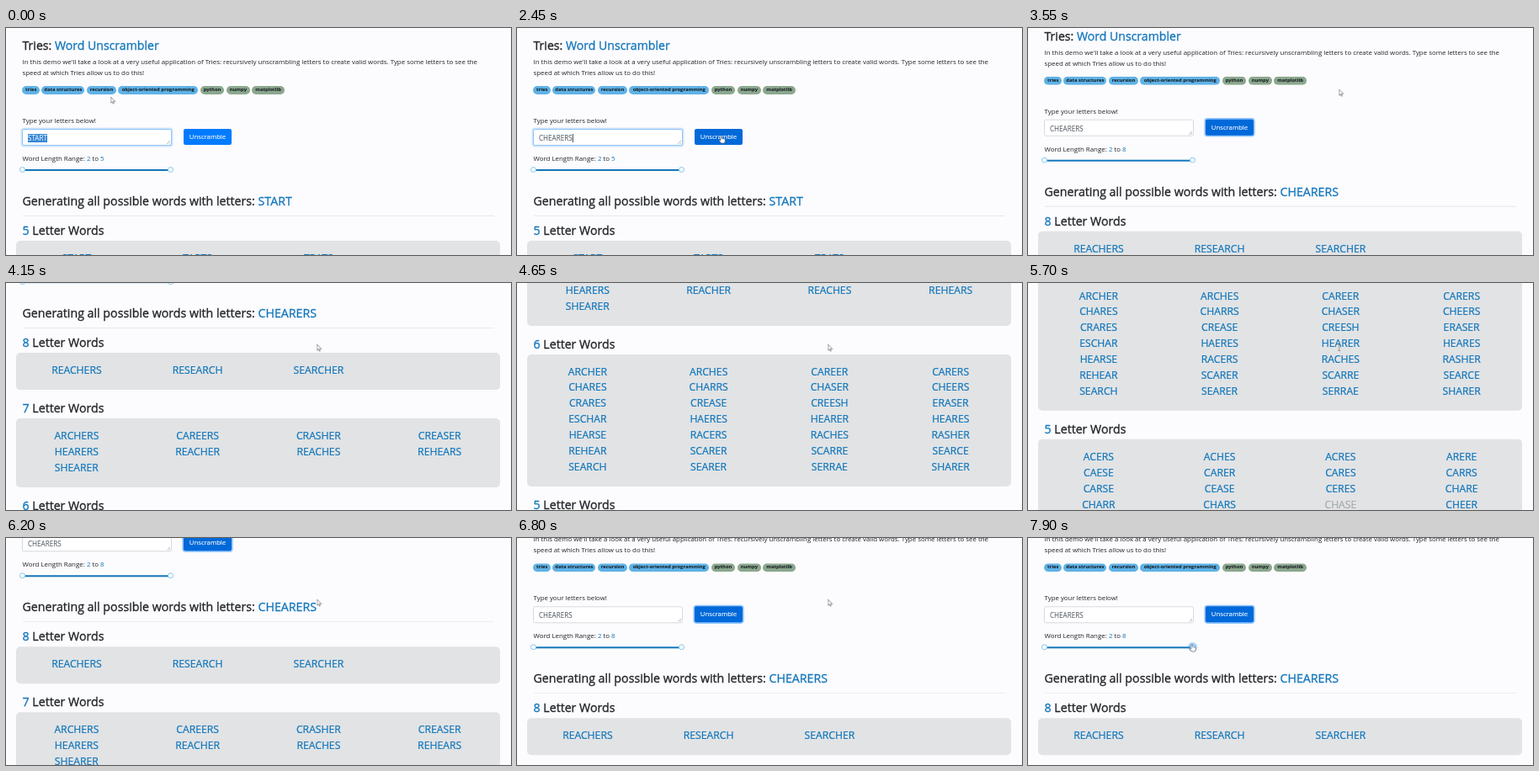
Animation, 600 px wide and 270 px high, one loop 8 s. Source, as an HTML page:

```html
<!DOCTYPE html>
<html lang="en">
<head>
<meta charset="utf-8">
<title>Word Unscrambler</title>
<style>
  :root { --blue: #1377bb; --ink: #212529; }
  html, body { margin: 0; width: 100%; height: 100%; overflow: hidden; background: #fcfbfd; }
  body { position: relative; font: 7.85px/20px "Open Sans", "Noto Sans", sans-serif; color: var(--ink); }
  b { font-weight: 400; color: var(--blue); }
  .page, .page > *, .cursor, .cursor svg { position: absolute; }
  .page { inset: 0; }
  .text { left: 19.5px; white-space: nowrap; }
  .big, h2 { font-size: 14.2px; -webkit-text-stroke: .32px currentColor; }
  .swap { display: inline-grid; }
  .swap > * { grid-area: 1 / 1; }

  .tag { top: 69.3px; height: 9.4px; border-radius: 5px; background: #5fb2e6; color: #10171c;
    font-size: 5.85px; font-weight: 700; line-height: 9px; text-align: center; white-space: nowrap; }
  .tag.lib { background: #8ba78e; }

  .field { left: 19px; top: 120px; width: 177.5px; height: 20px; box-sizing: border-box;
    border: 1px solid #ced4da; border-radius: 2.2px; background: #fff; color: #495057; font-size: 8.1px; }
  .field > * { position: absolute; top: 4.5px; left: 6px; height: 10.5px; line-height: 10.5px; white-space: nowrap; }
  .selected { background: #3487d6; color: #fff; }
  .typed { overflow: hidden; }
  .caret { width: .5px; background: #444; }
  .field .grip { left: auto; top: auto; right: 1px; bottom: 1px; width: 4px; height: 4px;
    background: linear-gradient(135deg, #0000 50%, #bbb 50% 62%, #0000 62% 78%, #bbb 78% 90%, #0000 90%); }
  .button { left: 211px; top: 119.5px; width: 57px; height: 19.5px; border-radius: 2.2px;
    background: #007bff; color: #fff; font-size: 7.75px; line-height: 19.5px; text-align: center;
    -webkit-text-stroke: .12px #fff; }

  .track { left: 19px; top: 167.5px; width: 177px; height: 2px; background: var(--blue); }
  .handle { top: 165px; width: 5px; height: 5px; border: 1.1px solid #7cc5ee; border-radius: 50%; background: #fff; }
  .rule { left: 19.5px; top: 222.5px; width: 560px; height: 1px; background: #e8e8ea; }

  .results { left: 12px; top: 229px; width: 575px; }
  h2 { margin: 0 0 0 7.5px; line-height: 24px; font-weight: 400; }
  .box { display: grid; grid-template-columns: repeat(4, 1fr); grid-auto-rows: 18.95px; padding: 11px 0 14px;
    margin-bottom: 9.9px; border-radius: 5px; background: #e1e3e5; color: var(--blue);
    font-size: 12.2px; line-height: 19px; text-align: center; -webkit-text-stroke: .24px currentColor; }
  .dim { color: #a8abae; }

  .cursor { left: 0; top: 0; }
  .cursor svg { left: 0; top: 0; overflow: visible; fill: #fff; stroke: #666; stroke-width: .7; stroke-linejoin: round; }

  /* Everything shares one eight second loop. */
  .page { animation: scroll 8s linear infinite; }
  .cursor { animation: move 8s ease-in-out infinite; }
  .before, .after, .selected, .typed, .caret, .field, .button, .hot, .arrow, .beam, .hand {
    animation: 8s step-end infinite; }
  .before { animation-name: before; }
  .after { animation-name: after; }
  .selected { animation-name: selected; }
  .typed { animation-name: typed; }
  .caret { animation-name: caret; }
  .field { animation-name: field; }
  .button { animation-name: button; }
  .hot { animation-name: hot; }
  .arrow { animation-name: arrow; }
  .beam { animation-name: beam; }
  .hand { animation-name: hand; }

  @keyframes scroll {
    0% { transform: none; }
    43% { transform: translateY(0); animation-timing-function: cubic-bezier(.4, .1, .75, .75); }
    51.875% { transform: translateY(-169.5px); }
    58.125% { transform: translateY(-361.5px); animation-timing-function: ease-out; }
    65.6% { transform: translateY(-560px); animation-timing-function: ease-in; }
    71.25% { transform: translateY(-453px); }
    77.5% { transform: translateY(-124px); animation-timing-function: ease-out; }
    85%, to { transform: translateY(-38.7px); }
  }
  @keyframes move {
    0%, 20% { transform: translate(124.5px, 82px); }
    28.75%, 33% { transform: translate(242px, 128px); }
    40.6%, 87.5% { transform: translate(369.5px, 73px); }
    95.6%, to { transform: translate(194px, 126px); }
  }
  @keyframes before { 0% { opacity: 1; } 32.5%, to { opacity: 0; } }
  @keyframes after { 0% { opacity: 0; } 32.5%, to { opacity: 1; } }
  @keyframes selected { 0% { opacity: 1; } 1.25%, to { opacity: 0; } }
  @keyframes typed {
    0% { width: 0; }
    1.25% { width: .631em; }
    4.375% { width: 1.369em; }
    6.25% { width: 1.925em; }
    7.5% { width: 2.558em; }
    9.375% { width: 3.176em; }
    11.25% { width: 3.732em; }
    14.375% { width: 4.35em; }
    16.25%, to { width: 5em; }
  }
  @keyframes caret {
    0% { opacity: 0; transform: none; }
    1.25% { opacity: 1; transform: translateX(.631em); }
    4.375% { transform: translateX(1.369em); }
    6.25% { transform: translateX(1.925em); }
    7.5% { transform: translateX(2.558em); }
    9.375% { transform: translateX(3.176em); }
    11.25% { transform: translateX(3.732em); }
    14.375% { transform: translateX(4.35em); }
    16.25% { opacity: 1; transform: translateX(4.92em); }
    32.5%, to { opacity: 0; transform: translateX(4.92em); }
  }
  @keyframes field {
    0% { border-color: #8cc3f8; box-shadow: 0 0 0 1.5px #007bff2b; }
    32.5%, to { border-color: #d6dade; box-shadow: none; }
  }
  @keyframes button {
    0% { background: #007bff; box-shadow: none; }
    27.5% { background: #0069d9; box-shadow: none; }
    32.5%, to { background: #0069d9; box-shadow: 0 0 0 1.6px #007bff70; }
  }
  @keyframes hot {
    0% { border-color: #7cc5ee; box-shadow: none; }
    95%, to { border-color: #40a9ff; box-shadow: 0 0 0 2.2px #1890ff55; }
  }
  @keyframes arrow { 0% { opacity: 1; } 27.5% { opacity: 0; } 35% { opacity: 1; } 70.5% { opacity: 0; } 72% { opacity: 1; } 95%, to { opacity: 0; } }
  @keyframes beam { 0% { opacity: 0; } 70.5% { opacity: 1; } 72%, to { opacity: 0; } }
  @keyframes hand { 0% { opacity: 0; } 27.5% { opacity: 1; } 35% { opacity: 0; } 95%, to { opacity: 1; } }
</style>
</head>
<body>
<main class="page">
  <div class="text big" style="top:11.3px;font-size:14.1px">Tries: <b>Word Unscrambler</b></div>
  <div class="text" style="top:30.5px;font-size:7.86px;line-height:12.5px;padding-top:3.5px">In this demo we'll take a look at a very useful application of Tries: recursively unscrambling letters to create valid words. Type some letters to see the<br>speed at which Tries allow us to do this!</div>

  <div class="text" style="top:100.3px">Type your letters below!</div>
  <div class="field">
    <span class="typed">CHEARERS</span>
    <span class="selected">START</span>
    <i class="caret"></i><i class="grip"></i>
  </div>
  <div class="button">Unscramble</div>
  <div class="text" style="top:145px;font-size:7.92px">Word Length Range: <b>2</b> to <b class="swap"><span class="before">5</span><span class="after">8</span></b></div>
  <i class="track"></i>
  <i class="handle" style="left:16px"></i>
  <i class="handle hot" style="left:192px"></i>

  <div class="text big" style="top:196.2px">Generating all possible words with letters: <b class="swap"><span class="before">START</span><span class="after">CHEARERS</span></b></div>
  <i class="rule"></i>
  <section class="results before"></section>
  <section class="results after"></section>
</main>

<div class="cursor">
  <svg class="arrow" width="6" height="9"><path d="M0 0V7.2L1.7 5.7 2.8 8.2 3.9 7.7 2.8 5.3H5.1Z"/></svg>
  <svg class="beam" width="4" height="8"><path d="M-1.2 0H1.6M.2 0V7.6M-1.2 7.6H1.6" fill="none"/></svg>
  <svg class="hand" width="8" height="10"><path d="M0 .6Q.7-.4 1.4.6V3.4L4.9 4.2Q5.5 4.5 5.3 5.6L4.6 9H.6L-1.7 5.9Q-1.8 4.8-.8 5.1L0 5.8Z"/></svg>
</div>

<script>
  const tags = [
    ["tries", 19.3, 20.7], ["data structures", 42.3, 51], ["recursion", 96, 35],
    ["object-oriented programming", 133.3, 95],
    ["python", 231, 28, "lib"], ["numpy", 261.7, 28.3, "lib"], ["matplotlib", 292.3, 38.5, "lib"],
  ];
  const oldWords = ["START TARTS TRATS"];
  const newWords = [
    "REACHERS RESEARCH SEARCHER",
    "ARCHERS CAREERS CRASHER CREASER HEARERS REACHER REACHES REHEARS SHEARER",
    `ARCHER ARCHES CAREER CARERS CHARES CHARRS CHASER CHEERS CRARES CREASE CREESH ERASER
     ESCHAR HAERES HEARER HEARES HEARSE RACERS RACHES RASHER REHEAR SCARER SCARRE SEARCE
     SEARCH SEARER SERRAE SHARER`,
    `ACERS ACHES ACRES ARERE CAESE CARER CARES CARRS CARSE CEASE CERES CHARE
     CHARR CHARS CHASE CHEER CRARE CRASH CREES ERASE ESCAR HARES HEARE HEARS
     HERES HERSE RACER RACES RACHE RARES REACH REARS REECH SCARE SCEAR SEARE
     SERAC SERER SERRA SERRE SHARE SHEAR SHEER SHERE`,
  ];

  const wordCell = word => `<span${word === "CHASE" ? ' class="dim"' : ""}>${word}</span>`;
  const group = list => {
    const words = list.split(/\s+/);
    return `<h2><b>${words[0].length}</b> Letter Words</h2><div class="box">${words.map(wordCell).join("")}</div>`;
  };
  const fill = (selector, lists) =>
    document.querySelector(selector).innerHTML = lists.map(group).join("");

  fill(".results.before", oldWords);
  fill(".results.after", newWords);
  document.querySelector(".page").insertAdjacentHTML("beforeend", tags.map(([name, left, width, kind = ""]) =>
    `<span class="tag ${kind}" style="left:${left}px;width:${width}px">${name}</span>`).join(""));
</script>
</body>
</html>
```
